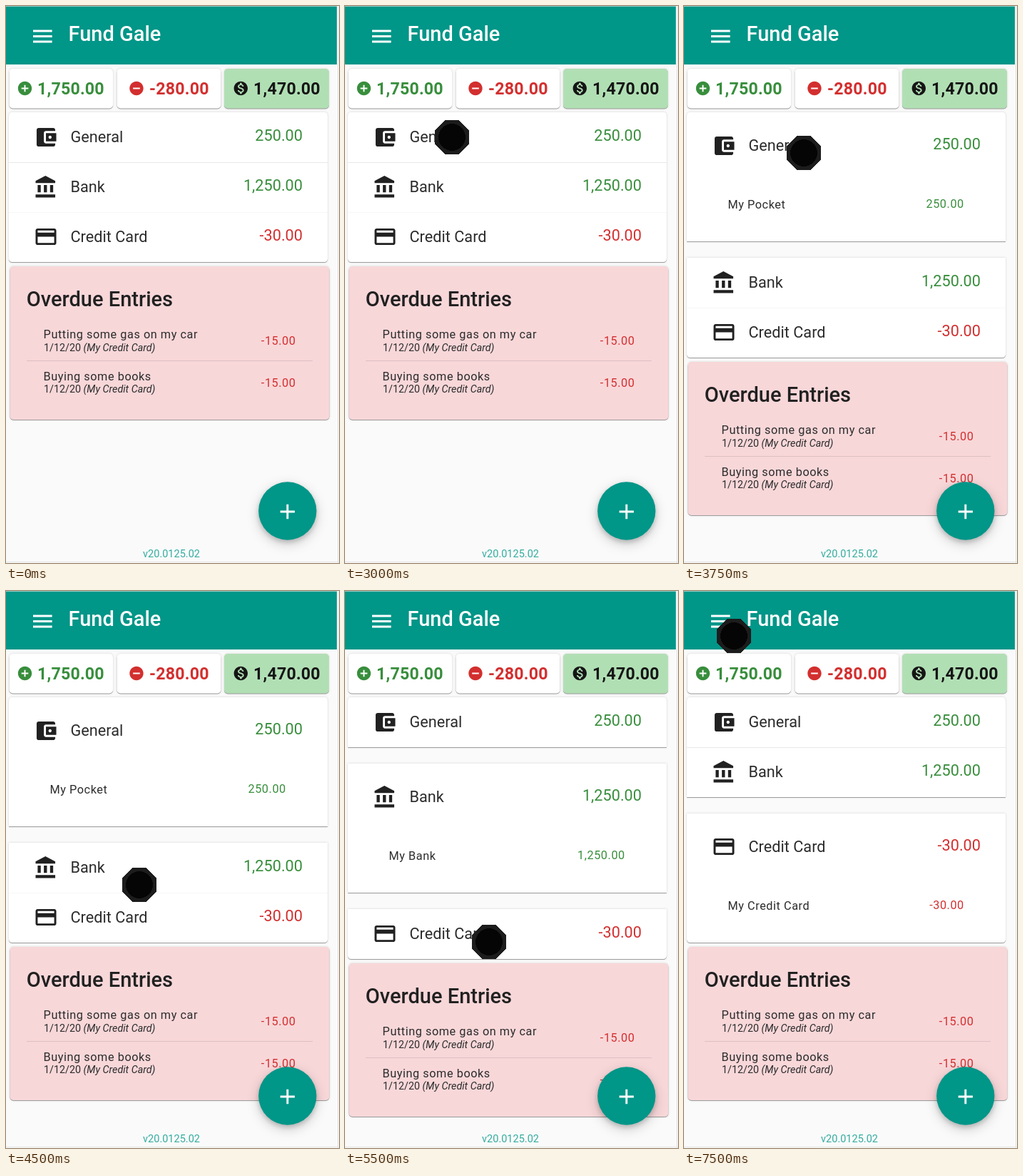
These frames come from a looping animation (467x781 px, 8000 ms). An HTML page:

```html
<!DOCTYPE html>
<html lang="en">
<head>
<meta charset="utf-8">
<title>Fund Gale</title>
<style>
  html, body { margin: 0; width: 100%; height: 100%; overflow: hidden; background: #fafafa; }
  #stage { display: block; width: 467px; height: 781px; font-family: Roboto, sans-serif; }
  .card { filter: drop-shadow(0 1.5px .7px rgba(0,0,0,.32)) drop-shadow(0 .5px 1.5px rgba(0,0,0,.16)); }
  .fab { filter: drop-shadow(0 3px 3px rgba(0,0,0,.16)) drop-shadow(0 5px 8px rgba(0,0,0,.2)); }
  .h6 { font-size: 29px; font-weight: 500; }
  .sum { font-size: 23.2px; font-weight: 700; letter-spacing: .2px; }
  .row { font-size: 21.7px; }
  .item { font-size: 16.3px; letter-spacing: .0333em; }
  .small { font-size: 14.3px; }
  .foot { font-size: 14.5px; text-anchor: middle; }
  .end { text-anchor: end; }
</style>
</head>
<body>
<svg id="stage" viewBox="0 0 467 781" xmlns="http://www.w3.org/2000/svg"></svg>
<script>
const NS = 'http://www.w3.org/2000/svg';
const stage = document.getElementById('stage');
const INK = '#212121', SOFT = '#2c2c2c', GREEN = '#388e3c', RED = '#d32f2f', TEAL = '#009688';
const ROW = 70, HEAD = 24, GROW = 111, GAP = 23, TOP = 149, LOOP = 8000;

const DISC = 'M12 2C6.48 2 2 6.48 2 12s4.48 10 10 10 10-4.48 10-10S17.52 2 12 2z';
const ICON = {
  menu: 'M3 18h18v-2H3v2zm0-5h18v-2H3v2zm0-7v2h18V6H3z',
  add: 'M19 13h-6v6h-2v-6H5v-2h6V5h2v6h6v2z',
  plus: DISC + 'm5 11h-4v4h-2v-4H7v-2h4V7h2v4h4v2z',
  minus: DISC + 'm5 11H7v-2h10v2z',
  money: DISC + 'm1.41 16.09V20h-2.67v-1.93c-1.71-.36-3.16-1.46-3.27-3.4h1.96c.1 1.05.82 1.87 2.65 1.87 1.96 0 2.4-.98 2.4-1.59 0-.83-.44-1.61-2.67-2.14-2.48-.6-4.18-1.62-4.18-3.67 0-1.72 1.39-2.84 3.11-3.21V4h2.67v1.95c1.86.45 2.79 1.86 2.85 3.39H14.3c-.05-1.11-.64-1.87-2.22-1.87-1.5 0-2.4.68-2.4 1.64 0 .84.65 1.39 2.67 1.91s4.18 1.39 4.18 3.91c-.01 1.83-1.38 2.83-3.12 3.16z',
  wallet: 'M21 18v1c0 1.1-.9 2-2 2H5c-1.11 0-2-.9-2-2V5c0-1.1.89-2 2-2h14c1.1 0 2 .9 2 2v1h-9c-1.11 0-2 .9-2 2v8c0 1.1.89 2 2 2h9zm-9-2h10V8H12v8zm4-2.5c-.83 0-1.5-.67-1.5-1.5s.67-1.5 1.5-1.5 1.5.67 1.5 1.5-.67 1.5-1.5 1.5z',
  bank: 'M4 10v7h3v-7H4zm6 0v7h3v-7h-3zM2 22h19v-3H2v3zm14-12v7h3v-7h-3zm-4.5-9L2 6v2h19V6l-9.5-5z',
  card: 'M20 4H4c-1.11 0-1.99.89-1.99 2L2 18c0 1.11.89 2 2 2h16c1.11 0 2-.89 2-2V6c0-1.11-.89-2-2-2zm0 14H4v-6h16v6zm0-10H4V6h16v2z'
};

function set(node, attrs) {
  for (const k in attrs) node.setAttribute(k, attrs[k]);
  return node;
}
function el(parent, tag, attrs) {
  return parent.appendChild(set(document.createElementNS(NS, tag), attrs));
}
function rect(parent, x, y, width, height, fill, more) {
  return el(parent, 'rect', { x, y, width, height, fill, ...more });
}
function text(parent, str, x, y, cls, fill) {
  const t = el(parent, 'text', { x, y, class: cls, fill });
  t.textContent = str;
  return t;
}
function icon(parent, name, cx, cy, fill, scale = 1.45) {
  return el(parent, 'path', {
    d: ICON[name], fill, 'fill-rule': 'evenodd',
    transform: `translate(${cx - 12 * scale} ${cy - 12 * scale}) scale(${scale})`
  });
}
// Card outline with separate top and bottom corner radii
function outline(x, y, w, h, a, b) {
  return `M${x + a} ${y}h${w - 2 * a}q${a} 0 ${a} ${a}v${h - a - b}q0 ${b} ${-b} ${b}` +
    `h${2 * b - w}q${-b} 0 ${-b} ${-b}v${a + b - h}q0 ${-a} ${a} ${-a}z`;
}
// Regular octagon around 0,0 with the given inner radius
function octagon(r) {
  const s = r * Math.tan(Math.PI / 8);
  return `M${-s} ${-r}L${s} ${-r} ${r} ${-s} ${r} ${s} ${s} ${r} ${-s} ${r} ${-r} ${s} ${-r} ${-s}z`;
}

// Page and top bar
rect(stage, 0, 0, 467, 781, '#fafafa');
rect(stage, 0, 0, 464, 82, TEAL);
rect(stage, 0, 0, 464, 1, '#8fcac3');
icon(stage, 'menu', 51.3, 42.5, '#fff', 1.48);
text(stage, 'Fund Gale', 87.5, 49, 'h6', '#fff');

// Totals
[[4.5, 145.5, '#fff', 'plus', 26.5, '1,750.00', 44, GREEN],
 [155.5, 146, '#fff', 'minus', 183, '-280.00', 201, RED],
 [306, 147, '#b1dfb4', 'money', 329.3, '1,470.00', 347, '#151515']
].forEach(([x, w, bg, ic, cx, str, tx, fill]) => {
  rect(stage, x, 88, w, 55.5, bg, { rx: 5, class: 'card' });
  icon(stage, ic, cx, 115.5, fill, .967);
  text(stage, str, tx, 123.5, 'sum', fill);
});

// Account panels share one shadow, so touching panels cast none on each other
const backs = el(stage, 'g', { class: 'card', fill: '#fff' });
const panels = [
  ['wallet', 'General', '250.00', 'My Pocket', '250.00', GREEN, 35, 0],
  ['bank', 'Bank', '1,250.00', 'My Bank', '1,250.00', GREEN, 35, .09],
  ['card', 'Credit Card', '-30.00', 'My Credit Card', '-30.00', RED, 34.5, .03]
].map(([ic, name, sum, sub, subSum, fill, iy, rule]) => {
  const back = el(backs, 'path', {});
  const line = rect(stage, 4, 0, 447, 1, '#000');
  const clip = el(stage, 'svg', { x: 0, width: 464 });
  const head = el(clip, 'g', {});
  icon(head, ic, 56, iy, INK);
  text(head, name, 90.5, 42, 'row', SOFT);
  text(head, sum, 416, 39.5, 'row end', fill);
  const body = el(clip, 'g', {});
  text(body, sub, 61.5, 40.5, 'item', SOFT);
  text(body, subSum, 392.8, 39.5, 'item end', fill);
  const tap = rect(clip, 4, 0, 447, ROW, '#33b5e5', { 'fill-opacity': .3 });
  return { back, line, clip, head, body, tap, rule };
});

// Overdue list, drawn with its top at 0
const overdue = el(stage, 'g', {});
rect(overdue, 5.5, 0, 448, 215, '#f8d7d9', { rx: 5, class: 'card' });
text(overdue, 'Overdue Entries', 28.8, 56, 'h6', INK);
['Putting some gas on my car', 'Buying some books'].forEach((str, i) => {
  const y = i * 58.4;
  text(overdue, str, 52.6, 101.3 + y, 'item', SOFT);
  const date = text(overdue, '1/12/20 ', 53, 119 + y, 'small', SOFT);
  el(date, 'tspan', { 'font-style': 'italic' }).textContent = '(My Credit Card)';
  text(overdue, '-15.00', 406.5, 110.3 + y, 'item end', RED);
});
rect(overdue, 29, 132, 401, 1, '#dcc0c2');

// Fixed parts
text(stage, 'v20.0125.02', 232, 773, 'foot', '#33aca0');
el(stage, 'circle', { cx: 394.8, cy: 708, r: 40.7, fill: TEAL, class: 'fab' });
icon(stage, 'add', 394.8, 709, '#fff');
rect(stage, 464, 0, 3, 781, '#fdfdfd');
rect(stage, 465, 0, 1, 781, '#dedede');
rect(stage, 0, 779, 467, 1, '#e6e6e6');

const pointer = el(stage, 'g', { 'shape-rendering': 'crispEdges' });
el(pointer, 'path', { d: octagon(24), fill: '#1c1c1c' });
el(pointer, 'circle', { r: 19, fill: '#050505' });

// Pointer stops: time, x, y
const stops = [
  [750, 436, 316], [1000, 320, 243], [1250, 140, 106], [1500, 78, 78],
  [1750, 71, 71], [3000, 150, 184], [3250, 168, 206], [4000, 181, 285],
  [4250, 185, 375], [4500, 187, 412], [5250, 198, 440], [5500, 202, 492],
  [6750, 130, 245], [7000, 70, 63]
];
// Panel states: time, openness of each panel, tapped panel
const states = [
  [0, [0, 0, 0], -1],
  [3500, [.2, 0, 0], 0], [3750, [1, 0, 0], -1],
  [4750, [.2, .8, 0], 1], [5000, [0, 1, 0], -1],
  [6000, [0, .8, .2], 2], [6250, [0, 0, 1], -1]
];
const latest = (list, t) => list.filter(s => s[0] <= t).pop();

function layout(open, tapped) {
  let y = TOP;
  panels.forEach((p, i) => {
    const e = open[i];
    const h = Math.round(ROW + GROW * e), headH = Math.round(ROW + HEAD * e);
    const gap = i ? Math.max(e, open[i - 1]) : 0;
    y += Math.round(GAP * gap);
    set(p.back, { d: outline(4, y, 447, h, i === 0 ? 5 : 0, i === 2 ? 5 : 0) });
    set(p.line, { y, opacity: p.rule * (1 - gap) });
    set(p.clip, { y, height: h });
    set(p.head, { transform: `translate(0 ${Math.round(HEAD / 2 * e)})` });
    set(p.body, { transform: `translate(0 ${headH})`, opacity: e ? 1 : 0 });
    set(p.tap, { height: headH, opacity: i === tapped ? 1 : 0 });
    y += h;
  });
  set(overdue, { transform: `translate(0 ${y + 6})` });
}

function draw(t) {
  const [, open, tapped] = latest(states, t);
  layout(open, tapped);
  const stop = latest(stops, t);
  set(pointer, stop
    ? { transform: `translate(${stop[1]} ${stop[2]})`, opacity: 1 }
    : { opacity: 0 });
}

const start = performance.now();
function tick() {
  draw((performance.now() - start) % LOOP);
  requestAnimationFrame(tick);
}
tick();
</script>
</body>
</html>
```
